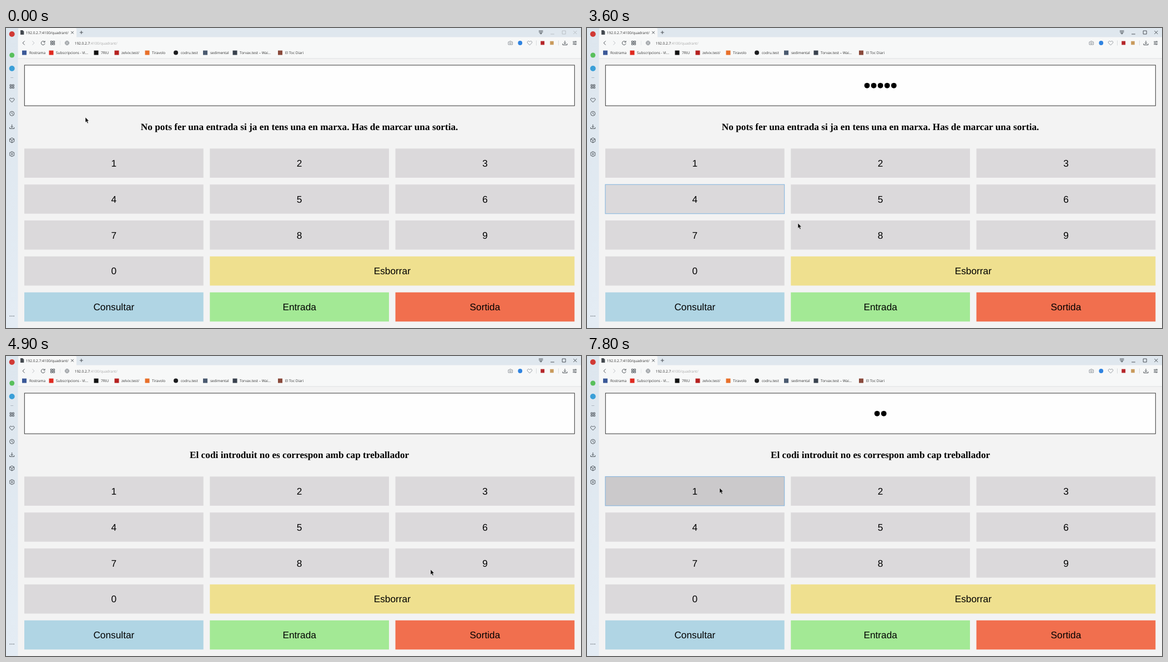
Animation, 1036 px wide and 541 px high, one loop 8 s. Source, as an HTML page:

```html
<!DOCTYPE html>
<html lang="ca">
<head>
<meta charset="utf-8">
<title>Quadrant</title>
<style>
html, body { margin: 0; width: 100%; height: 100%; overflow: hidden; background: #f3f3f3; }
svg { display: block; width: 1036px; height: 541px; text-rendering: geometricPrecision; }
text { font: 6.5px "Open Sans", "Noto Sans", sans-serif; fill: #333; }
.key { font: 17.28px "Liberation Sans", Arial, sans-serif; fill: #000; text-anchor: middle; }
#msg { font: bold 17.28px "Liberation Serif", "Times New Roman", serif; fill: #000; text-anchor: middle; }
.icon { fill: none; stroke-width: .9; }
</style>
</head>
<body>
<svg id="stage" viewBox="0 0 1036 541">
  <defs>
    <linearGradient id="side" x2="0" y2="1">
      <stop stop-color="#dde6ee"/><stop offset="1" stop-color="#e4ecf4"/>
    </linearGradient>
  </defs>
  <rect width="1036" height="541" fill="#f3f3f3"/>
  <rect width="1036" height="17" fill="#dfe7ee"/>
  <rect x="21.5" y="16.5" width="1014.5" height="38.5" fill="#f7f8f8"/>
  <rect x="21.5" y="54.6" width="1014.5" height=".8" fill="#d8dadc"/>
  <rect width="21.5" height="541" fill="url(#side)"/>
  <path d="M22 17V2Q22 0 24 0H125Q127 0 127 2V17Z" fill="#f7f8f8"/>
  <g id="chrome"></g>
  <rect x="33.3" y="67" width="991" height="73.2" fill="#fefefe" stroke="#222" stroke-width=".9"/>
  <g id="dots"></g>
  <text id="msg" x="528.6" y="184.3"></text>
  <g id="pad"></g>
  <rect id="ring" fill="none" stroke="#7fb2de" stroke-width="1"/>
  <g id="pointer">
    <path id="arrow" d="M0 0V9.2L2.1 7.4 3.7 11 5.3 10.3 3.7 6.8H6.5Z" fill="#080808" stroke="#fff" stroke-width=".5"/>
    <path id="beam" d="M-2-5.3Q0-5.3 0-4Q0-5.3 2-5.3M0-4V4.5M-2 5.6Q0 5.6 0 4.5Q0 5.6 2 5.6" fill="none" stroke="#333" stroke-width=".9"/>
  </g>
</svg>
<script>
const $ = id => document.getElementById(id);

// Browser frame
const ink = '#3c4248', pale = '#b4babf';
const icon = (x, y, d, color = ink, id = '') =>
  `<path ${id && `id="${id}"`} class="icon" transform="translate(${x} ${y})" d="${d}" stroke="${color}"/>`;
const label = (x, y, s, color = '#333') => `<text x="${x}" y="${y}" fill="${color}">${s}</text>`;
const disc = (x, y, r, color) => `<circle cx="${x}" cy="${y}" r="${r}" fill="${color}"/>`;
const square = (x, y, s, color) =>
  `<rect x="${x - s / 2}" y="${y - s / 2}" width="${s}" height="${s}" fill="${color}"/>`;

const grid = 'M-3.6-3.2H-.7V-.6H-3.6ZM.7-3.2H3.6V-.6H.7ZM-3.6.8H-.7V3.4H-3.6ZM.7.8H3.6V3.4H.7Z';
const heart = 'M0 4L-3.7.2C-5.6-2.2-2-5.2 0-2.2C2-5.2 5.6-2.2 3.7.2Z';
const ring = 'M-4 0A4 4 0 1 1 4 0A4 4 0 1 1-4 0';
const cross = 'M-3-3L3 3M3-3L-3 3';
const load = 'M0-4V1.5M-2-.5L0 1.6 2-.5M-4 1V3.5H4V1';
const host = '192.0.2.7', path = ':4100/quadrant/';

const bookmarks = [
  [33, 42, '#3b5998', 'Rostrama'],
  [81.5, 90, '#e0291f', 'Subscripcions - Vi...'],
  [162.5, 171, '#111', '7RIU'],
  [199.5, 208, '#b5201f', 'zelvix.test/'],
  [254.5, 263, '#e8702a', 'Tiravolo'],
  [306, 315, '#1b1c1e', 'codru.test'],
  [359, 368, '#4a5a70', 'sedimental'],
  [412.5, 421, '#39424e', 'Torvax.test – Wai...'],
  [494, 503, '#8a4a3c', 'El Toc Diari']
];

$('chrome').innerHTML = [
  disc(10.7, 11, 5, '#d13a35'), disc(10.7, 49, 4.5, '#58c05c'), disc(10.7, 73, 5, '#3a9fd8'),
  icon(10.7, 89.5, 'M-2.5 0H2.5', '#a9b3bc'),
  icon(10.7, 105.3, grid), icon(10.7, 130, heart),
  icon(10.7, 154.3, ring + 'M0-2.3V.3L1.8 1.5'),
  icon(10.7, 178, load),
  icon(10.7, 202.5, 'M0-4.4L4-2.3V2.3L0 4.4-4 2.3V-2.3ZM-4-2.3L0-.2 4-2.3M0-.2V4.4'),
  icon(10.7, 227.3, 'M-1-4.3H1L1.6-3 3.3-3.2 4.3-1.4 3.4 0 4.3 1.4 3.3 3.2 1.6 3 1 4.3H-1L-1.6 3-3.3 3.2-4.3 1.4-3.4 0-4.3-1.4-3.3-3.2-1.6-3ZM-1.3 0A1.3 1.3 0 1 1 1.3 0A1.3 1.3 0 1 1-1.3 0'),
  ...[-3.3, 0, 3.3].map(d => disc(10.7 + d, 519.5, .75, ink)),

  '<path d="M26 4H30L32.3 6.3V12H26Z" fill="#454a50"/>',
  label(35.8, 10.6, host + path),
  icon(119.5, 8.2, 'M-2.3-2.3L2.3 2.3M2.3-2.3L-2.3 2.3'),
  icon(135.8, 8, 'M-3 0H3M0-3V3'),
  icon(963.7, 8, 'M-3.8-3H3.8M-3.8-.8H3.8M-2 1.2H2L0 3.2Z'),
  icon(984.5, 8, 'M-3.3 3H3.3', pale, 'min'),
  icon(1005.2, 8, 'M-3-3H3V3H-3Z', pale, 'max'),
  icon(1025.4, 8, cross, pale, 'close'),

  icon(32, 27, 'M1.6-3.5L-1.9 0 1.6 3.5'),
  icon(49, 27, 'M-1.6-3.5L1.9 0-1.6 3.5', '#b8bcc0'),
  icon(66.8, 27, 'M2.7-1.9A3.4 3.4 0 1 0 3.3.8M3.3-3.8V-1.4H.9'),
  icon(84, 26.8, grid),
  icon(97.5, 27, 'M0-4V4', '#e3e5e7'),
  icon(110, 27, 'M-3.6 0A3.6 3.6 0 1 1 3.6 0A3.6 3.6 0 1 1-3.6 0M-3.6 0H3.6M0-3.6Q-3.2 0 0 3.6Q3.2 0 0-3.6', '#7d8388'),
  `<text x="123.7" y="29.6">${host}<tspan fill="#aaa">${path}</tspan></text>`,
  icon(908.8, 27, 'M-3.8-2H-1.8L-1.2-3.2H1.2L1.8-2H3.8V3H-3.8ZM-1.5.4A1.5 1.5 0 1 1 1.5.4A1.5 1.5 0 1 1-1.5.4', '#8a9096'),
  disc(926.3, 27, 3.9, '#2f83e0'),
  icon(943.5, 27, heart, '#8a9096'),
  icon(955.5, 27, 'M0-4.5V4.5', '#d5d8da'),
  square(966.7, 27, 6.8, '#b5262a'), square(983.5, 27, 6.5, '#c99a5c'),
  icon(995.5, 27, 'M0-4.5V4.5', '#d5d8da'),
  icon(1007, 27, load),
  icon(1024.7, 27, 'M-3.5-2.6H3.5M-3.5 0H3.5M-3.5 2.6H3.5M1.5-3.5V-1.7M-1.5-.9V.9M1 1.7V3.5'),
  ...bookmarks.map(([x, tx, color, name]) =>
    (name === 'codru.test' ? disc(x, 44.6, 4, color) : square(x, 44.6, 8, color)) + label(tx, 47, name))
].join('');

// Keypad: label, column, row, columns spanned, base, hover and pressed colours
const keys = [...'1234567890'].map((s, i) => [s, i % 3, i / 3 | 0, 1, '#dbd9db', '#cbc9cb']);
keys.push(
  ['Esborrar', 1, 3, 2, '#efe08f', '#d6c67a'],
  ['Consultar', 0, 4, 1, '#b0d5e4', '#9cbfce'],
  ['Entrada', 1, 4, 1, '#a3e995', '#90d183'],
  ['Sortida', 2, 4, 1, '#f16f4e', '#d66447', '#ab5a41']);
const pad = keys.map(([name, col, row, span, base, hover, down = hover]) => ({
  name, base, hover, down, digit: name.length === 1,
  x: 33 + 334.3 * col, y: 217.4 + 64.83 * row, w: 322.7 + 334.3 * (span - 1), h: 52.6
}));
$('pad').innerHTML = pad.map(k =>
  `<rect x="${k.x}" y="${k.y}" width="${k.w}" height="${k.h}"/>` +
  `<text class="key" x="${k.x + k.w / 2}" y="${k.y + 32.6}">${k.name}</text>`).join('');
const faces = $('pad').querySelectorAll('rect');

// Pointer path: time, x, y
const route = [
  [100, 143, 161], [300, 165, 200], [500, 189, 238], [600, 189, 238], [800, 169, 233],
  [2100, 169, 233], [2300, 185, 285], [2400, 190, 304], [2500, 190, 304], [2600, 190, 308],
  [3400, 190, 308], [3500, 205, 312], [3600, 380, 352], [3800, 792, 451], [3900, 803, 475],
  [4100, 812, 498], [4700, 812, 498], [4800, 806, 482], [4900, 765, 385], [5100, 570, 170],
  [5200, 485, 122], [5300, 463, 121], [5400, 490, 150], [5600, 539, 172.5], [5800, 520, 164],
  [6000, 470, 160], [6200, 420, 175], [6400, 372, 188], [6500, 358, 180], [6700, 250, 165],
  [6800, 205, 195], [6900, 191, 225], [7100, 239, 238]
];
function pointerAt(t) {
  const i = route.findIndex(p => p[0] > t);
  if (i < 0) return route.at(-1).slice(1);
  if (i === 0) return route[0].slice(1);
  const [t0, x0, y0] = route[i - 1], [t1, x1, y1] = route[i], f = (t - t0) / (t1 - t0);
  return [x0 + (x1 - x0) * f, y0 + (y1 - y0) * f];
}

// Latest value whose start time has passed
const latest = (t, steps) => steps.filter(s => s[0] <= t).at(-1)[1];
const focusSteps = [[0, ''], [800, '1'], [2600, '4'], [4500, 'Sortida'], [4600, ''], [7300, '1']];
const dotSteps = [[0, 0], [1300, 1], [1400, 2], [1900, 3], [2900, 4], [3300, 5], [4600, 0], [7700, 1], [7800, 2]];
const inside = (x, y, b) => x >= b.x && x <= b.x + b.w && y >= b.y && y <= b.y + b.h;
const field = { x: 33, y: 67, w: 991, h: 73 };

function draw(t) {
  const [x, y] = pointerAt(t), focus = latest(t, focusSteps), count = latest(t, dotSteps);
  const late = t >= 4600;

  for (const id of ['min', 'max', 'close']) $(id).setAttribute('stroke', t < 700 ? pale : ink);
  $('msg').textContent = late
    ? 'El codi introduit no es correspon amb cap treballador'
    : 'No pots fer una entrada si ja en tens una en marxa. Has de marcar una sortia.';
  $('dots').innerHTML = Array.from({ length: count }, (_, i) =>
    disc(528.7 + (i - (count - 1) / 2) * 12.08, 103.8, 4.9, '#000')).join('');

  // Digits darken only once clicked; the wide commands react to hovering
  $('ring').style.display = focus ? '' : 'none';
  pad.forEach((k, i) => {
    const focused = k.name === focus, over = inside(x, y, k) && (focused || !k.digit);
    faces[i].setAttribute('fill', !over ? k.base : focused ? k.down : k.hover);
    if (focused) {
      const box = { x: k.x, y: k.y, width: k.w, height: k.h };
      for (const a in box) $('ring').setAttribute(a, box[a]);
    }
  });

  const half = late ? 198 : 287;
  const text = inside(x, y, field) || inside(x, y, { x: 528.6 - half, y: 169, w: 2 * half, h: 20 });
  $('arrow').style.display = text ? 'none' : '';
  $('beam').style.display = text ? '' : 'none';
  $('pointer').setAttribute('transform', `translate(${x} ${y})`);
}

const start = performance.now();
function tick() {
  const t = (performance.now() - start) % 8000;
  draw(Math.floor(t / 100) * 100);
  requestAnimationFrame(tick);
}
tick();
</script>
</body>
</html>
```
